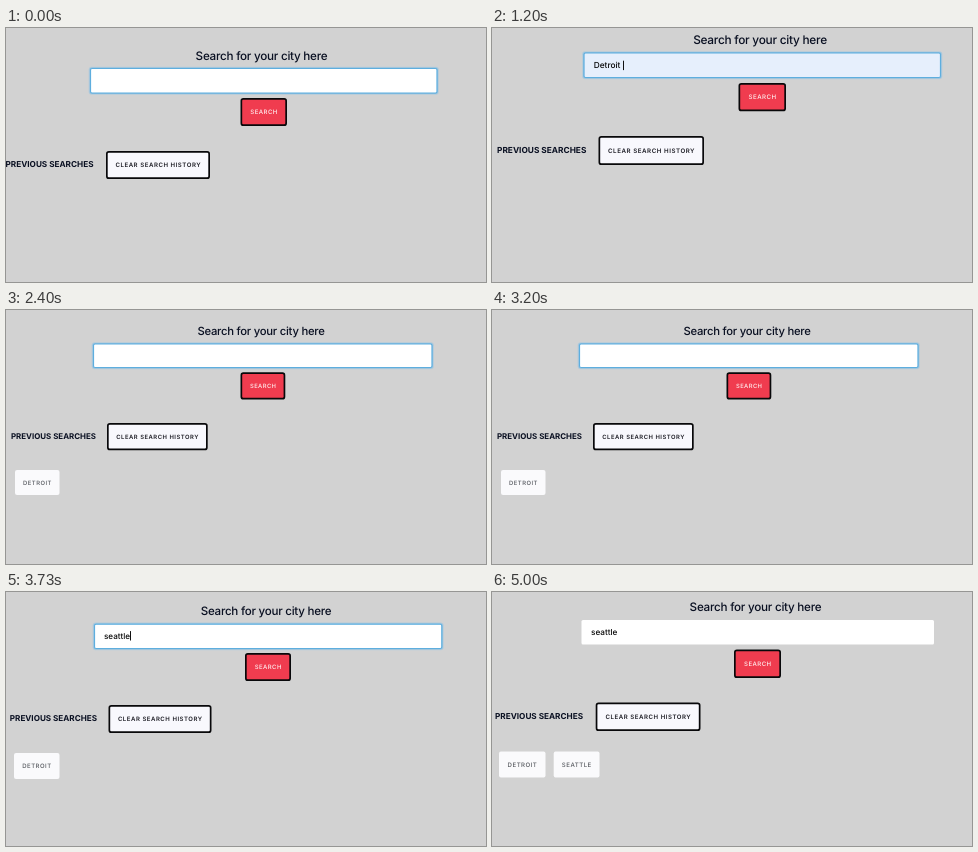
Animation, 480 px wide and 254 px high, one loop 5990 ms. Source, as an HTML page:

```html
<!DOCTYPE html>
<html lang="en">
<head>
<meta charset="utf-8">
<title>City search</title>
<style>
  html, body { margin: 0; width: 100%; height: 100%; overflow: hidden; background: #d2d2d2; }
  svg { display: block; width: 100%; height: 100%; }
  text { font-family: Inter, "Open Sans", sans-serif; fill: #0a1022; white-space: pre; text-rendering: geometricPrecision; }
  .mid { text-anchor: middle; }
  .title { font-weight: 450; letter-spacing: -.022em; }
  .typed { font-weight: 450; fill: #080808; }
  .label { font-weight: 700; letter-spacing: 0; }
  .btn { font-weight: 600; letter-spacing: .088em; fill: #1c1c24; }
  .chip { font-weight: 500; letter-spacing: .08em; fill: #55585e; }
  .on-red { font-weight: 500; letter-spacing: .07em; fill: #fff0f1; }
  .slide { animation: 5990ms step-end infinite; }
  .s1 { animation-name: s1; }
  .s2 { animation-name: s2; }
  .s3 { animation-name: s3; }
  .s4 { animation-name: s4; }
  @keyframes s1 { 0% { visibility: hidden } 20.0334%, 100% { visibility: visible } }
  @keyframes s2 { 0% { visibility: hidden } 40.0668%, 100% { visibility: visible } }
  @keyframes s3 { 0% { visibility: hidden } 60.1002%, 100% { visibility: visible } }
  @keyframes s4 { 0% { visibility: hidden } 80.1336%, 100% { visibility: visible } }
</style>
</head>
<body>
<svg id="stage" viewBox="0 0 480 254"></svg>
<script>
// Boxes are [left, top, right, bottom]; k scales the type.
const slides = [
  { k: 1, title: [255.5, 31.5], input: [84, 40, 431.5, 65.5], focus: true,
    search: [234.5, 70, 281, 98], label: [-.5, 139], clear: [100, 123, 204, 151] },
  { k: 1.015, title: [268, 16.3], input: [91.5, 24.5, 449, 50], focus: true, fill: '#e6effc',
    typed: ['Detroit', 101.7, 40.3], caret: 131.5,
    search: [246.5, 55, 294, 83.3], label: [5, 124.7], clear: [106.5, 108, 212, 137] },
  { k: .965, title: [255, 25.3], input: [87, 33.5, 426.5, 58], focus: true,
    search: [234.5, 62.3, 279.3, 89.5], label: [5, 128.7], clear: [101, 113, 201.7, 140.3],
    chips: [['DETROIT', 9, 160, 53.5, 185]] },
  { k: .99, title: [260, 23.3], input: [88, 31.7, 436.3, 57], focus: true,
    typed: ['seattle', 98, 46.7], caret: 124.5,
    search: [239, 61, 285, 89], label: [3.8, 129.4], clear: [102.5, 113, 205.5, 141],
    chips: [['DETROIT', 8, 161, 53.5, 187]] },
  { k: 1, title: [263.5, 19.3], input: [89.5, 28, 442, 52.5],
    typed: ['seattle', 99, 43],
    search: [242, 57.5, 289, 86], label: [3, 126.8], clear: [103.7, 110.5, 208.5, 139],
    chips: [['DETROIT', 7, 159.5, 53.5, 185.5], ['SEATTLE', 61.7, 159.5, 107.5, 185.5]] }
];

const text = (s, x, y, size, cls) =>
  `<text x="${x}" y="${y}" font-size="${size}" class="${cls}">${s}</text>`;

// The stroke lies inside the box.
const box = ([l, t, r, b], fill, stroke = 'none', w = 0, rx = 2) =>
  `<rect x="${l + w / 2}" y="${t + w / 2}" width="${r - l - w}" height="${b - t - w}"
    rx="${rx}" fill="${fill}" stroke="${stroke}" stroke-width="${w}"/>`;

function button(b, s, fill, k, cls) {
  const size = 6.1 * k;
  return box(b, fill, '#08080a', 1.7) +
    text(s, (b[0] + b[2]) / 2 + size * .045, (b[1] + b[3]) / 2 + size * .36, size, 'mid ' + cls);
}

function field({ input, focus, fill = '#fff' }) {
  if (!focus) return box(input, fill, 'none', 0, 1.5);
  const grow = d => input.map((v, i) => v + (i < 2 ? -d : d));
  return box(grow(1.3), '#b4cbda', 'none', 0, 2.8) +
    box(grow(.5), '#8fc0e0', 'none', 0, 2.2) +
    box(input, fill, '#5eaede', 1.1, 1.5);
}

function draw(s, i) {
  const { k, typed, caret, chips = [] } = s;
  let out = '<rect width="480" height="254" fill="#d2d2d2"/>' +
    text('Search for your city here', ...s.title, 11.7 * k, 'mid title') + field(s);
  if (typed) out += text(...typed, 8.2 * k, 'typed');
  if (caret) out += `<rect x="${caret - .5}" y="${typed[2] - 7.6}" width="1" height="9.4" fill="#111"/>`;
  out += button(s.search, 'SEARCH', '#f03c4f', k, 'btn on-red') +
    text('PREVIOUS SEARCHES', ...s.label, 8.2 * k, 'label') +
    button(s.clear, 'CLEAR SEARCH HISTORY', '#f8f8fd', k, 'btn');
  for (const [name, ...b] of chips)
    out += box(b, '#fafafc') +
      text(name, (b[0] + b[2]) / 2 + .2, (b[1] + b[3]) / 2 + 2.2, 6.1 * k, 'mid chip');
  return `<g class="slide s${i}">${out}</g>`;
}

document.getElementById('stage').innerHTML = slides.map(draw).join('');
</script>
</body>
</html>
```
